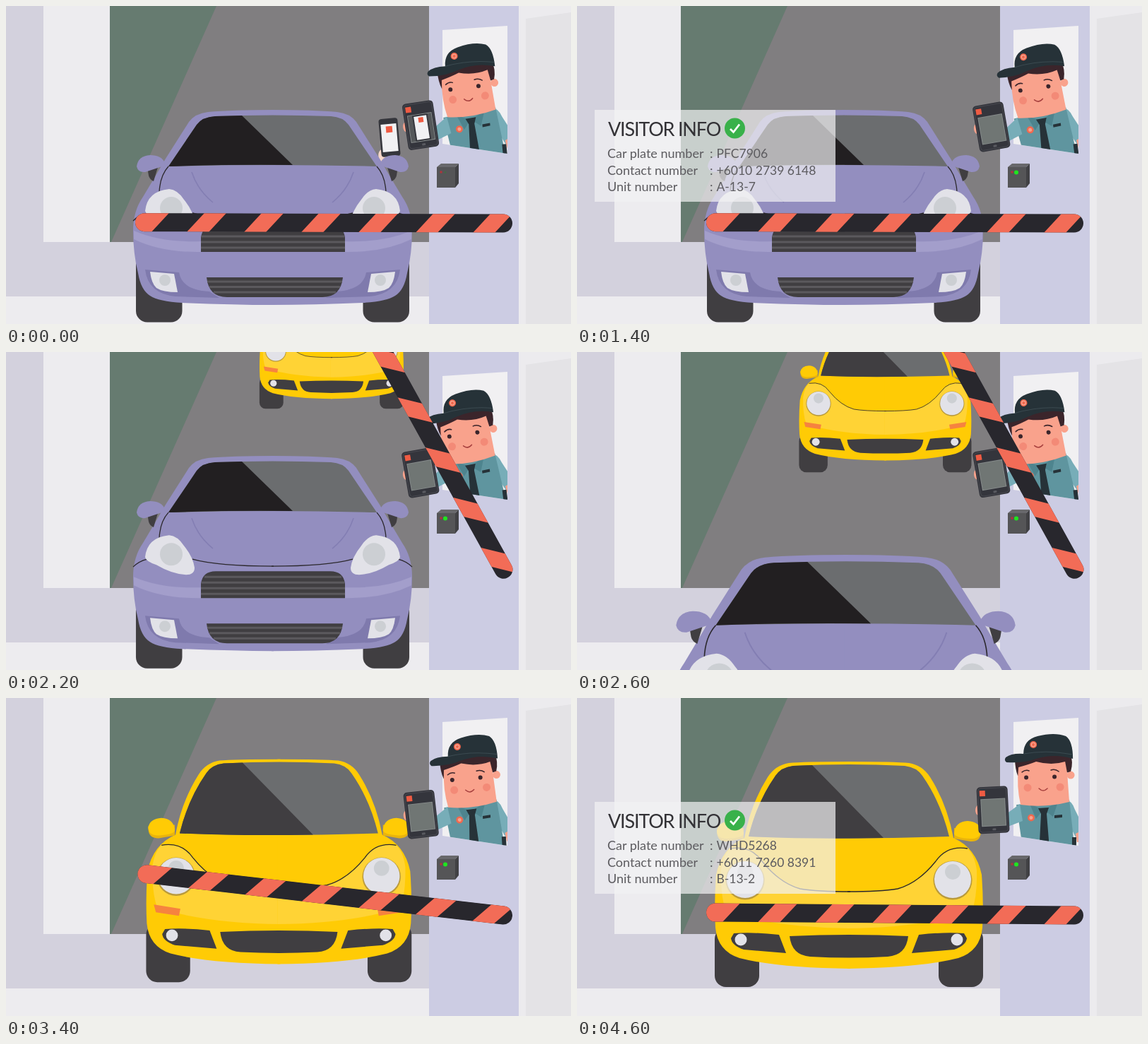
Write an HTML page that moves like this. It is 800 px wide and 450 px high and loops after 4.7 s.

```html
<!DOCTYPE html>
<html lang="en">
<head>
<meta charset="utf-8">
<title>Visitor gate</title>
<style>
html, body { margin: 0; height: 100%; overflow: hidden; }
svg { display: block; width: 100vw; height: 100vh; }
text { font: 18px Lato, "Open Sans", sans-serif; fill: #5c5b5f; }
.title { font-size: 27px; letter-spacing: -1.2px; fill: #333236; }
.value { font-size: 17.5px; }
.dark { fill: #403e41; }
.lamp { fill: #e2e2e8; }
.lens { fill: #cccfd3; }
.line { fill: none; stroke: #2b282c; stroke-width: 1.3; }
</style>
</head>
<body>
<svg viewBox="0 0 800 450">
  <defs>
    <clipPath id="windowClip"><path d="M560 0H710V209L618 195L560 186Z"/></clipPath>
    <clipPath id="screenClip"><rect x="-16" y="-15" width="33" height="37"/></clipPath>
    <clipPath id="barClip"><rect x="183" y="294.5" width="534" height="26" rx="13"/></clipPath>

    <g id="purpleBase">
      <rect class="dark" x="184" y="350" width="65.500" height="97.500" rx="16"/>
      <path fill="#938ebf" d="M379 147Q320 147 286 150Q268 152 259 164L226 216Q219 228 212 240L194 270Q180 290 180 318Q180 350 187 378Q191 402 204 410Q216 418 250 420Q320 423 379 423Z"/>
      <path fill="#a39ecb" d="M181 318Q220 335 276 333V348Q220 349 181 330Z"/>
      <path fill="#7f7aad" d="M197 373L245 377Q249 402 288 404L302 413L240 411Q201 407 197 373Z"/>
    </g>
    <g id="purpleTrim">
      <path fill="none" stroke="#837eb3" stroke-width="1.600" d="M263 235Q271 260 293 278"/>
      <path class="line" d="M230 227Q218 240 217 264M180 304Q188 296 200 293M264 293Q300 303 379 303"/>
      <path class="lamp" d="M197 290Q200 262 231 259Q243 260 252 274Q265 290 267 305Q267 315 255 315Q235 314 213 301Q198 296 197 290Z"/>
      <circle class="lens" cx="234" cy="286" r="16"/>
      <path class="lamp" d="M204 376L238 379L243 405Q222 405 213 399Q206 393 204 376Z"/>
      <circle class="lens" cx="225" cy="388" r="8"/>
      <path class="dark" d="M200 228L216 225L209 248Q203 245 202 240Z"/>
      <path fill="#938ebf" d="M225 222Q220 211 204 211Q187 212 185 227Q187 236 197 235L224 226Z"/>
    </g>

    <g id="yellowBase">
      <rect class="dark" x="195" y="325" width="63" height="84" rx="16"/>
      <path fill="#ffcb05" d="M387 90Q320 90 300 92Q281 95 270 112Q246 150 237 198Q205 212 197 250Q194 290 196 325Q199 358 230 368Q285 382 387 383Z"/>
      <path fill="#ffd335" d="M204 244Q207 222 217 213Q246 208 262 231Q287 262 316 270Q340 274 387 274V326Q285 325 211 303Q203 280 204 244Z"/>
    </g>
    <g id="yellowTrim">
      <path class="line" d="M217 213Q246 208 262 231Q287 262 316 270Q340 274 387 274"/>
      <circle cx="238" cy="258" r="27.500" fill="#b99a3c"/>
      <circle class="lamp" cx="238" cy="257" r="26"/>
      <circle class="lens" cx="238" cy="246" r="11"/>
      <path fill="#f6833f" d="M206 298L244 304L242 314L209 309Z"/>
      <path class="dark" d="M222 333Q250 331 286 335L296 361L236 356Q219 350 218 340Z"/>
      <circle class="lamp" cx="232" cy="342" r="8.500"/>
      <path fill="#e9b40c" d="M198 186Q197 204 213 203L236 199V184Z"/>
      <path fill="#ffcb05" d="M198 188Q200 175 217 174Q235 175 236 192Q234 198 214 199Q199 200 198 188Z"/>
    </g>
  </defs>

  <rect width="800" height="450" fill="#d3d1dd"/>
  <path fill="#edecef" d="M53 0H147V334H53ZM0 411H600V450H0Z"/>
  <path fill="#807e80" d="M147 0H600V334H147Z"/>
  <path fill="#667b70" d="M147 0H298L149 334H147Z"/>
  <path fill="#cccce3" d="M599 0H726V450H599Z"/>
  <path fill="#ecebee" d="M726 0H800V450H726Z"/>
  <path fill="#e4e3e6" d="M736 18L800 9V450H736Z"/>
  <path fill="#f1f0f2" d="M618 34L710 28V209L618 195Z"/>

  <path fill="#68686b" d="M610 228L616 223H641L636 228Z"/>
  <path fill="#414144" d="M636 228L641 223V251L636 257Z"/>
  <path fill="#555557" d="M610 228H636V257H610Z"/>
  <circle cx="616" cy="235" r="1.800" fill="#b0343c"/>
  <circle id="led" cx="622" cy="235.500"/>

  <g id="phone">
    <ellipse cx="-12" cy="25" rx="6" ry="9" fill="#f6d8ca"/>
    <rect x="-13.500" y="-27" width="27" height="54" rx="4" fill="#35363c"/>
    <rect x="-11" y="-19" width="22" height="39" fill="#f1f1f3"/>
    <rect x="-4" y="-16" width="9" height="9" fill="#ef5b43"/>
  </g>

  <g id="yellow">
    <use href="#yellowBase"/><use href="#yellowBase" transform="translate(770) scale(-1 1)"/>
    <path fill="#6b6d6f" d="M243 196Q255 147 281 110Q289 98 306 96Q385 92 464 96Q481 98 489 110Q515 147 527 196Q385 201 243 196Z"/>
    <path class="dark" d="M243 196Q255 147 281 110Q289 98 306 96L333 95L434 198Q330 200 243 196Z"/>
    <use href="#yellowTrim"/><use href="#yellowTrim" transform="translate(770) scale(-1 1)"/>
    <path class="dark" d="M301 337Q385 333 469 337Q466 364 440 366Q385 369 330 366Q304 364 301 337Z"/>
  </g>

  <g id="purple">
    <use href="#purpleBase"/><use href="#purpleBase" transform="translate(755) scale(-1 1)"/>
    <path fill="#6b6d6f" d="M230 227L270 168Q278 157 296 156Q377 153 460 156Q477 157 485 168L525 227Q377 223 230 227Z"/>
    <path fill="#221f21" d="M230 227L270 168Q278 157 296 156L334 155L406 225Q310 224 230 227Z"/>
    <use href="#purpleTrim"/><use href="#purpleTrim" transform="translate(755) scale(-1 1)"/>
    <path class="dark" d="M276 348V328Q278 310 297 310H459Q478 310 480 328V348ZM284 384H477Q474 412 448 412H313Q287 412 284 384Z"/>
    <path stroke="#5b595d" stroke-width="3" d="M281 318H475M277 326H479M276 334H480M276 342H480M285 390H476M288 397.500H473M294 405H467"/>
  </g>

  <g clip-path="url(#windowClip)">
    <g class="sway">
      <path fill="#77adb8" d="M690 143Q701 145 705 158L720 188L706 197L690 165Z"/>
      <path fill="#f9a28c" d="M706 192L718 186V204H708Z"/>
      <path fill="#5f959f" d="M622 151L697 144L706 225H633Z"/>
      <path fill="#4e848e" d="M641 150L660 158L650 171ZM681 147L661 158L674 168Z"/>
      <path fill="#263238" d="M653 156L668 155L665 164L670 225H654L657 164ZM676 166L687 165V169L676 170ZM701 197H707V215H701Z"/>
      <circle cx="643" cy="169.500" r="5" fill="#f0694f"/>
      <circle cx="643" cy="169.500" r="2.500" fill="#f9a28c"/>
      <circle cx="699" cy="109" r="5.500" fill="#f9a28c"/>
      <path fill="#3b252b" d="M620 86L698 78Q703 90 699 104L692 106L624 110Q620 100 620 86Z"/>
      <path fill="#f9a28c" d="M625 98Q640 94 650 90Q672 96 691 90L694 106L697 147Q662 156 628 151Q622 125 625 98Z"/>
      <path fill="#263238" d="M632 79Q632 59 652 54Q676 48 692 54Q702 61 702 86Q676 78 650 86Q632 93 608 91Q604 88 607 84Q615 78 632 79Z"/>
      <path fill="none" stroke="#3b4a50" d="M632 79Q666 73 701 80"/>
      <circle cx="646" cy="66" r="5" fill="#f0694f"/>
      <circle cx="646" cy="66" r="2.700" fill="none" stroke="#f9b09c"/>
      <circle cx="636" cy="112.500" r="3" fill="#3b252b"/>
      <circle cx="676" cy="111.500" r="3" fill="#3b252b"/>
      <circle cx="638" cy="127" r="5.500" fill="#f38a77"/>
      <circle cx="684" cy="126" r="5.500" fill="#f38a77"/>
      <path fill="none" stroke="#3b252b" stroke-width="1.500" stroke-linecap="round" d="M630 105Q635 101 640 103M671 102Q677 100 682 104"/>
      <path fill="none" stroke="#a8413f" stroke-width="1.500" stroke-linecap="round" d="M654 128Q660 134 666 128"/>
    </g>
  </g>
  <g class="sway">
    <path fill="#77adb8" d="M627 150L608 164L610 182L631 174Z"/>
    <ellipse cx="568" cy="159" rx="4" ry="7" fill="#f9a28c"/>
    <g transform="translate(589 158.500) rotate(-3)">
      <rect x="-22" y="-33" width="44" height="66" rx="5" fill="#34353c"/>
      <rect x="-20" y="-31" width="40" height="62" rx="4" fill="none" stroke="#484950"/>
      <rect x="-18" y="-28" width="8" height="8" fill="#ef5b43"/>
      <rect x="-17" y="-16" width="35" height="39" fill="#858a8a"/>
      <rect x="-16" y="-15" width="33" height="37" fill="#707674"/>
      <rect x="-2" y="26" width="5" height="3" rx="1" fill="#595a60"/>
      <g clip-path="url(#screenClip)">
        <g id="preview">
          <rect x="-18" y="-18" width="37" height="43" fill="#55585a"/>
          <g id="mini">
            <rect x="-11" y="-20" width="22" height="42" rx="3" fill="#35363c"/>
            <rect x="-9" y="-16" width="18" height="33" fill="#f1f1f3"/>
            <rect x="-3" y="-14" width="7" height="7" fill="#ef5b43"/>
          </g>
        </g>
      </g>
    </g>
  </g>

  <g id="bar"><g clip-path="url(#barClip)">
    <rect x="183" y="294" width="534" height="27" fill="#28272d"/>
    <path id="stripes" fill="#f26c57"/>
  </g></g>

  <g id="panel">
    <path fill="#f3f2f4" fill-opacity=".7" d="M25 147H366V277H25Z"/>
    <text class="title" x="44" y="184">VISITOR INFO</text>
    <circle cx="223.500" cy="173" r="14.500" fill="#39b14a"/>
    <path fill="none" stroke="#fff" stroke-width="2.800" d="M217 174L221.500 178.500L230 167.500"/>
    <text x="43" y="215">Car plate number</text><text x="188" y="215">:</text><text class="value" id="plate" x="197.500" y="215"/>
    <text x="43" y="239">Contact number</text><text x="188" y="239">:</text><text class="value" id="contact" x="197.500" y="239"/>
    <text x="43" y="262">Unit number</text><text x="188" y="262">:</text><text class="value" id="unit" x="197.500" y="262"/>
  </g>
</svg>
<script>
const LOOP = 4700;
const $ = id => document.getElementById(id);
const set = (el, name, value) => el.setAttribute(name, value);
const show = (id, on) => set($(id), 'display', on ? 'inline' : 'none');
const ramp = (t, a, b) => Math.min(1, Math.max(0, (t - a) / (b - a)));
const inOut = x => x < .5 ? 4 * x ** 3 : 1 - (2 - 2 * x) ** 3 / 2;
const backOut = x => 1 + 2.7 * (x - 1) ** 3 + 1.7 * (x - 1) ** 2;

// Smooth curve through [time, value] points, flat at both ends
function curve(t, pts) {
  const last = pts.length - 1;
  if (t <= pts[0][0]) return pts[0][1];
  if (t >= pts[last][0]) return pts[last][1];
  const i = pts.findIndex(p => p[0] > t) - 1;
  const slope = k => k < 1 || k >= last ? 0 :
    (pts[k + 1][1] - pts[k - 1][1]) / (pts[k + 1][0] - pts[k - 1][0]);
  const [ta, a] = pts[i], [tb, b] = pts[i + 1], d = tb - ta, x = (t - ta) / d;
  return a + (b - a) * x * x * (3 - 2 * x)
    + d * x * (1 - x) * (slope(i) * (1 - x) - slope(i + 1) * x);
}

const sway = [[0, -5.7], [1400, -7], [2200, -7], [2600, -6.8], [3000, -5.7], [3800, -1.5], [4700, .1]];
const carTimes = [1700, 2200, 2600, 3000, 3500];
const track = (...values) => values.map((v, i) => [carTimes[i], v]);
const carX = track(487, 461, 436.5, 407, 385);
const carY = track(-30, 80, 170, 301, 409);
const carScale = track(.43, .537, .642, .832, 1);
const visitors = [
  ['PFC7906', '+6010 2739 6148', 'A-13-7'],
  ['WHD5268', '+6011 7260 8391', 'B-13-2']
];

// The first stripe also fills the rounded left end
let stripes = 'M175 321h31l25 -27h-56Z';
for (let x = 256; x < 700; x += 81) stripes += `M${x} 321h31l25 -27h-31Z`;
set($('stripes'), 'd', stripes);

function draw(t) {
  const second = t > 2500;

  document.querySelectorAll('.sway').forEach(g =>
    set(g, 'transform', `rotate(${curve(t, sway)} 690 183)`));

  const p = Math.max(0, (t - 2200) / 400) ** 1.2;
  set($('purple'), 'transform',
    `translate(${377.5 + 3 * p} ${226 + 159 * p}) scale(${1 + .247 * p}) translate(-377.5 -226)`);
  show('purple', t < 3050);

  set($('yellow'), 'transform',
    `translate(${curve(t, carX)} ${curve(t, carY)}) scale(${curve(t, carScale)}) translate(-385 -409)`);
  show('yellow', t > 1700);

  const lift = inOut(ramp(t, 1580, 2150)) - inOut(ramp(t, 3050, 3550)) + inOut(ramp(t, 4540, 5110));
  set($('bar'), 'transform', `rotate(${.15 + 60.85 * lift} 704 308)`);

  const away = second
    ? 1 - inOut(ramp(t, 3520, 3740)) + inOut(ramp(t, 4100, 4400))
    : inOut(ramp(t, 1080, 1400));
  const tilt = second ? 20 : -5;
  const [x, y] = second ? [551, 160] : [543, 186];
  set($('phone'), 'transform', `translate(${x - 48 * away} ${y + 45 * away}) rotate(${tilt})`);
  set($('mini'), 'transform', `translate(${1 - 30 * away} ${3 + 34 * away}) rotate(${tilt + 5})`);
  show('phone', away < 1);
  show('preview', away < 1);

  const lit = t > 1000 && t < 3500 || t > 4150;
  set($('led'), 'r', lit ? 3 : 1.3);
  set($('led'), 'fill', lit ? '#1fe51f' : '#3d7044');

  const start = second ? 3500 : 650;
  const enter = ramp(t, start, start + 350);
  const gone = second ? 0 : ramp(t, 1640, 1860);
  set($('panel'), 'transform', `translate(0 ${74 * (1 - backOut(enter))})`);
  set($('panel'), 'opacity', Math.min(1, enter * 2) * (1 - gone));
  ['plate', 'contact', 'unit'].forEach((id, i) => $(id).textContent = visitors[+second][i]);
}

const begin = performance.now();
function frame() {
  draw((performance.now() - begin) % LOOP);
  requestAnimationFrame(frame);
}
frame();
</script>
</body>
</html>
```
